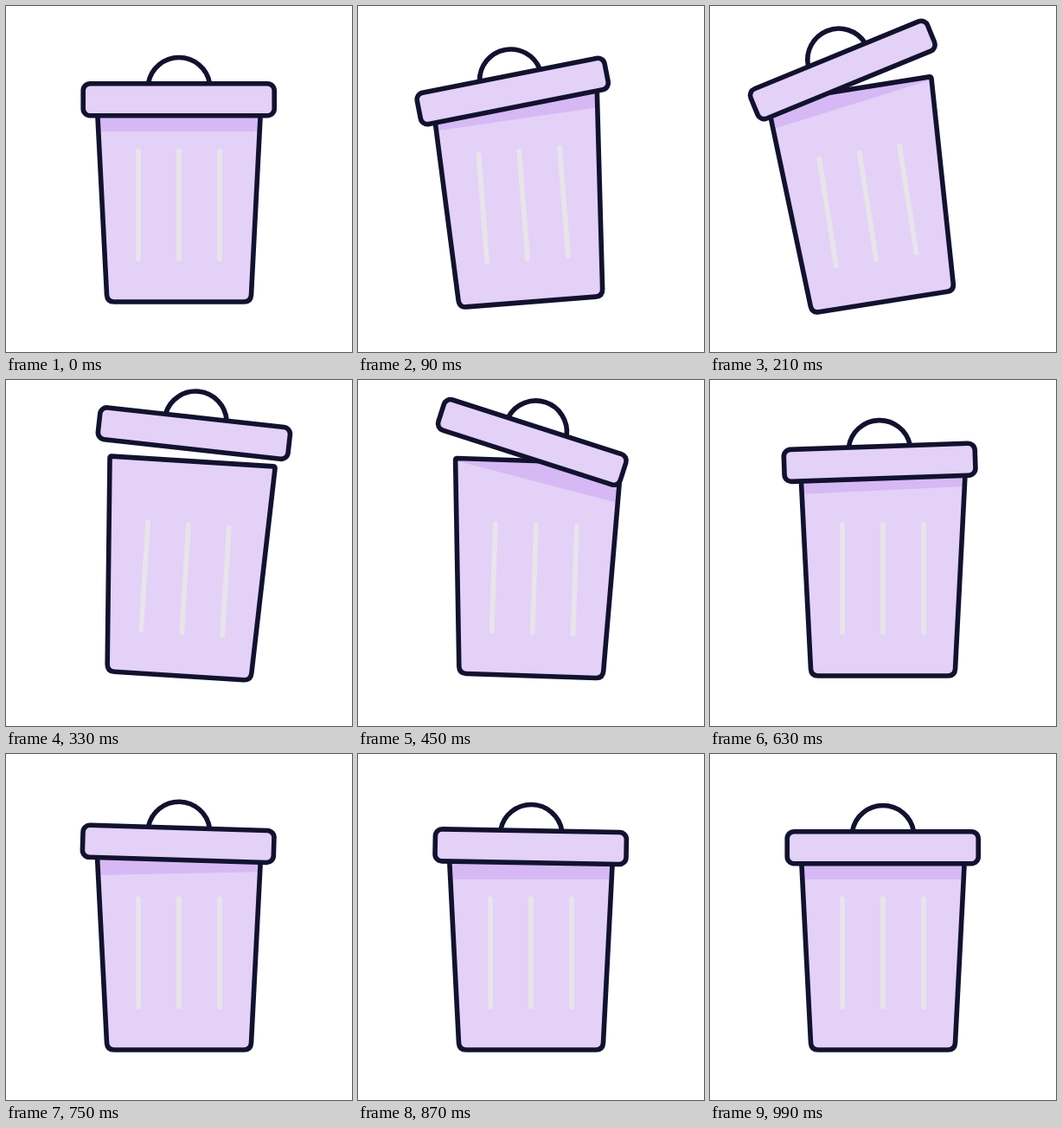
Animation of 400x400 px, one loop 1520 ms. Source, as an HTML page:

```html
<!DOCTYPE html>
<html lang="en">
<head>
<meta charset="utf-8">
<title>Bin</title>
<style>
  html, body { margin: 0; width: 100%; height: 100%; overflow: hidden; background: #fff; }
  svg { display: block; width: 100%; height: 100%; }
  .line { stroke: #12122f; stroke-width: 5.6; stroke-linejoin: round; stroke-linecap: round; }
  .fill { fill: #e3d1f8; }
  .shade { fill: #d6b9f4; }
  .rib { fill: none; stroke: #e8e4ec; stroke-width: 5.8; stroke-linecap: round; }
</style>
</head>
<body>
<svg viewBox="0 0 400 400">
  <defs>
    <path id="can" d="M106.2 93.5H293.8Q295.8 93.5 295.7 95.5L283.5 334Q283 342 275 342H125Q117 342 116.5 334L104.3 95.5Q104.2 93.5 106.2 93.5Z"/>
    <clipPath id="inside"><use href="#can"/></clipPath>
  </defs>
  <g id="bin">
    <use href="#can" class="fill"/>
    <g clip-path="url(#inside)"><path id="shade" class="shade"/></g>
    <path class="rib" d="M153 167.3V292M200 167.3V292M247 167.3V292"/>
    <use href="#can" class="line" fill="none"/>
    <g id="lid">
      <path class="line" fill="none" d="M164.6 89A36 36 0 0 1 235.4 89"/>
      <rect class="line fill" x="89.2" y="89.7" width="221" height="37" rx="8"/>
    </g>
  </g>
</svg>
<script>
const LOOP = 1520, STEP = 30, REST = 33;

const smooth = p => p * p * (3 - 2 * p);

// Eases from 0 through each [step, value] in turn, then holds.
function glide(s, ...stops) {
  let from = 0, since = 0;
  for (const [until, to] of stops) {
    if (s < until) return from + (to - from) * smooth((s - since) / (until - since));
    [since, from] = [until, to];
  }
  return from;
}

// The lid is thrown up quickly and sinks back softly.
function lift(s) {
  const top = 9.8;
  return 47.8 * (s < top ? smooth(s / top) : Math.exp(-(((s - top) / top) ** 2)));
}

const tilt = s => glide(s, [6.3, -9.7], [11.4, 3.85], [18.6, 0]);
const lidTurn = s => glide(s, [6.2, -14], [15.1, 15.9], [21, -2], [25.5, 1.85], [REST, 0]);
const lidShift = s => glide(s, [6.5, -4], [11, 0], [14.6, -7.5], [27, 0]);
const shadeLeft = s => 145 + glide(s, [6.5, -19], [11, -49], [15, -49], [21, -13], [28, 0]);
const shadeRight = s => 145 + glide(s, [6.5, -48], [11, -49], [15, -5.6], [21, -22], [28, 0]);

const [bin, lid, shade] = ["bin", "lid", "shade"].map(id => document.getElementById(id));

function draw(ms) {
  const step = Math.floor((ms % LOOP) / STEP);
  const s = step < REST ? step : 0;
  bin.setAttribute("transform", `rotate(${tilt(s)} 200 342)`);
  lid.setAttribute("transform",
    `translate(${lidShift(s)} ${-lift(s)}) rotate(${lidTurn(s)} 200 108.2)`);
  shade.setAttribute("d", `M104 80H296V${shadeRight(s)}L104 ${shadeLeft(s)}Z`);
}

const start = performance.now();
function tick() {
  draw(performance.now() - start);
  requestAnimationFrame(tick);
}
tick();
</script>
</body>
</html>
```
